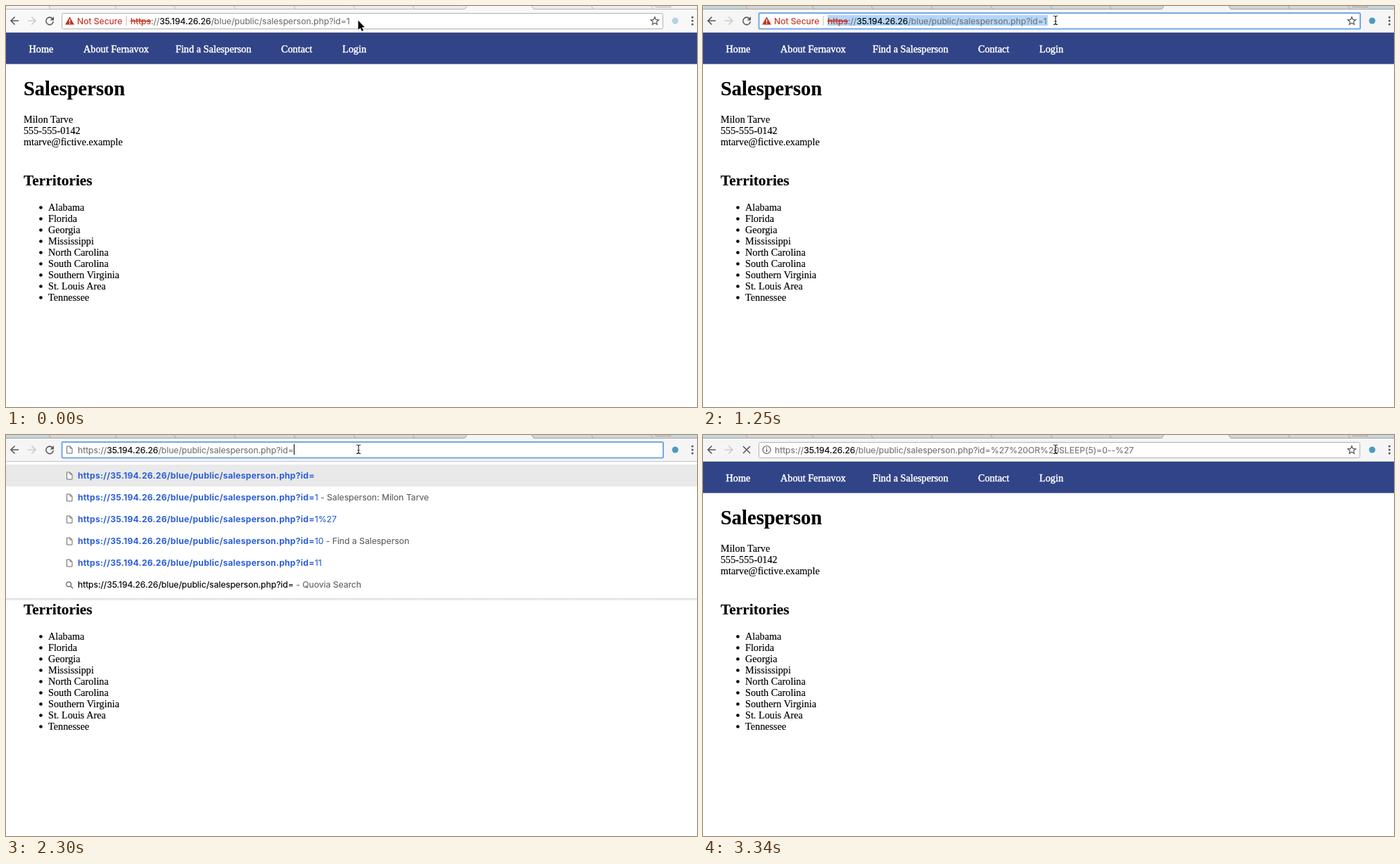
These frames come from a looping animation (982x570 px, 8 s). An HTML page:

```html
<!DOCTYPE html>
<html lang="en">
<head>
<meta charset="utf-8">
<title>Salesperson</title>
<style>
  html, body { margin: 0; width: 100%; height: 100%; overflow: hidden; background: #fff; }
  svg { display: block; }
  text { white-space: pre; color: #000; fill: currentColor; stroke: currentColor; stroke-width: .15px; }
  tspan { fill: currentColor; stroke: currentColor; }
  .page text { font: 14.24px "Liberation Serif", "Times New Roman", serif; }
  .page .h1 { font-size: 28.5px; font-weight: 700; }
  .page .h2 { font-size: 21.36px; font-weight: 700; }
  .page .nav { color: #fff; stroke-width: .45px; }
  .ui text { font: 12.15px Inter, Roboto, sans-serif; font-feature-settings: "calt" 0; }
  .ui .match { font-weight: 700; letter-spacing: .24px; stroke: none; }
  .blue { color: #2d60d6; }
  .grey { color: #757575; }
  .note { color: #626262; }
  .red { color: #c23321; }
  .strike { text-decoration: line-through; }
  .line { fill: none; stroke: #5a5a5a; stroke-width: 1.6; }
</style>
</head>
<body>
<svg id="stage" width="982" height="570" viewBox="0 0 982 570"></svg>
<script>
const LOOP = 8000;
// Start times of the scenes: idle, selected, hover, caret, suggestions, injected, loading
const STARTS = [0, 900, 1250, 1550, 2150, 2750, 3340];

const HOST = "35.194.26.26";
const PATH = "/blue/public/salesperson.php?id=";
const URL_BASE = "https://" + HOST + PATH;
const PERSON = "Milon Tarve";
const ENGINE = "Quovia";
const QUERY = "' OR SLEEP(5)=0--'";

const on = (scenes, body) => `<g data-on="${scenes}">${body}</g>`;
const text = (x, y, body, cls = "") => `<text x="${x}" y="${y}" class="${cls}">${body}</text>`;
const span = (cls, body) => `<tspan class="${cls}">${body}</tspan>`;
const rect = (x, y, w, h, fill, extra = "") =>
  `<rect x="${x}" y="${y}" width="${w}" height="${h}" fill="${fill}" ${extra}/>`;
const path = (d, extra = 'class="line"') => `<path d="${d}" ${extra}/>`;
const dot = (x, y, r, fill) => `<circle cx="${x}" cy="${y}" r="${r}" fill="${fill}"/>`;

function page() {
  const links = [[32.5, "Home"], [110, "About Fernavox"], [241, "Find a Salesperson"],
                 [391, "Contact"], [478, "Login"]];
  const lines = [PERSON, "555-555-0142", "mtarve@fictive.example"];
  const places = ["Alabama", "Florida", "Georgia", "Mississippi", "North Carolina",
                  "South Carolina", "Southern Virginia", "St. Louis Area", "Tennessee"];
  return `<g class="page">
    ${rect(0, 38, 982, 44.5, "#314487")}
    ${links.map(([x, s]) => text(x, 66, s, "nav")).join("")}
    ${text(25, 127, "Salesperson", "h1")}
    ${lines.map((s, i) => text(25, 166 + 16 * i, s)).join("")}
    ${text(25, 255, "Territories", "h2")}
    ${places.map((s, i) => dot(49.5, 286.5 + 16 * i, 2.3, "#000") + text(60, 290.5 + 16 * i, s)).join("")}
  </g>`;
}

function tabs(bg, ends, edge, bar) {
  const cuts = [61, 155, 239, 324, 409, 494, 578, 832, 917];
  const slants = cuts.map(x => `M${x} 0l2.5 4.5`).join("");
  return rect(0, 0, 982, 5, bg) + rect(0, 0, 61, 4, ends) + rect(946, 0, 36, 4, ends) +
    path("M922 0l2 1.5h21l-1-1.5", `fill="${bg}" stroke="${edge}"`) +
    rect(0, 5, 982, 32, bar) +
    path("M655 0L652 5H750L747 0Z", `fill="${bar}"`) +
    path(slants + "M0 4.5H652L655 0M747 0L750 4.5H982", `fill="none" stroke="${edge}"`) +
    rect(0, 37, 982, 1, "#c4c4c6");
}

const pageIcon = (x, y) =>
  path(`M${x - 3.5} ${y - 5}h4.5l3 3v7h-7.5zM${x + 1} ${y - 5}v3h3`,
    'fill="#fff" stroke="#6a6a6a"');

const searchIcon = (x, y) =>
  path(`M${x + 1.8} ${y + 1.8}l3.4 3.4M${x + 2.6} ${y - .8}a3.4 3.4 0 1 1-6.8 0a3.4 3.4 0 1 1 6.8 0`,
    'fill="none" stroke="#6a6a6a" stroke-width="1.3"');

function toolbar() {
  const back = x => `M${x + 6} 21H${x - 5}M${x + .5} 15.5L${x - 5} 21L${x + .5} 26.5`;
  const reload = path("M66 18A5.2 5.2 0 1 0 67.2 22") +
    path("M68 15v5.4h-5.4z", 'fill="#5a5a5a"');
  const star = Array.from({ length: 10 }, (_, i) => {
    const r = i % 2 ? 2.7 : 6, a = i * Math.PI / 5;
    return `${922 + r * Math.sin(a)},${21.5 - r * Math.cos(a)}`;
  }).join(" ");
  return on("0", tabs("#ececec", "#f3f3f3", "#b9b9b9", "#f8f8f8")) +
    on("1 2 3 4 5 6", tabs("#d5d5d5", "#c5d5db", "#a4a4a4", "#f5f5f5")) +
    path(back(12)) +
    path("M31 21H42M36.5 15.5L42 21L36.5 26.5", 'class="line" style="stroke:#cbcbcb"') +
    on("0 1 2 3 4 5", reload) +
    on("6", path("M57 16l10 10M67 16l-10 10")) +
    on("0 6", rect(79.5, 10.5, 854, 22, "#fff", 'rx="2" stroke="#b2b2b2"')) +
    on("1 2 3 4 5", rect(79.5, 10, 854.5, 22.5, "#fff", 'rx="1.5" stroke="#72a9e6" stroke-width="2"')) +
    on("0 1 2 3 6", `<polygon points="${star}" fill="none" stroke="#5a5a5a" stroke-width="1.2"/>`) +
    on("0", dot(951, 21, 4.5, "#b4d3e3")) +
    on("1 2 3 4 5 6", dot(951, 21, 4.5, "#4b9cbd")) +
    [16, 21, 26].map(y => dot(975.5, y, 1.5, "#5a5a5a")).join("");
}

function address() {
  const typed = tail => text(102, 25.5, span("grey", "https://") + HOST + span("grey", PATH + tail));
  const caret = x => rect(x, 13, 1, 15, "#000");
  const warning = path("M90.5 15.2L97 26.5H84Z", 'fill="#c23321"') +
    rect(89.8, 18.8, 1.4, 4, "#fff") + rect(89.8, 23.8, 1.4, 1.4, "#fff");
  const info = path("M96 21a5.5 5.5 0 1 1-11 0a5.5 5.5 0 1 1 11 0",
      'fill="none" stroke="#5a5a5a" stroke-width="1.2"') +
    rect(89.8, 20, 1.4, 4, "#5a5a5a") + rect(89.8, 17.6, 1.4, 1.4, "#5a5a5a");
  return on("1 2", rect(177, 13, 313, 15, "#b3d6fc")) +
    on("0 1 2 3", warning + text(101, 25.5, "Not Secure", "red") +
      rect(170.5, 14, 1, 14, "#d3b3ae") +
      text(177, 25.5, span("red strike", "https") + span("grey", "://") + HOST +
        span("grey", PATH + "1"))) +
    on("3", caret(489)) +
    on("4", pageIcon(90, 21) + typed("") + caret(409)) +
    on("5", pageIcon(90, 21) + typed(QUERY) + caret(520)) +
    on("6", info + typed("%27%20OR%20SLEEP(5)=0--%27"));
}

function suggestions(hits, search) {
  const count = hits.length + 1, bottom = 46 + 31 * count;
  const rowText = ([match, rest, note], i) => pageIcon(90, 58 + 31 * i) +
    text(102, 62 + 31 * i, span("blue match", URL_BASE + match) + span("blue", rest) +
      span("note", note));
  const last = 31 * hits.length;
  return rect(0, 38, 982, bottom - 38, "#fff") +
    rect(0, bottom, 982, 4, "url(#shade)") +
    rect(0, 42, 982, 31, "#e9e9e9") +
    hits.map(rowText).join("") +
    searchIcon(90, 58 + last) +
    text(102, 62 + last, URL_BASE + search + span("note", ` - ${ENGINE} Search`));
}

function pointers() {
  const arrow = path("M500.5 20.5v13.2l3-2.7l2.2 4.8l2.2-1l-2.2-4.6h4z",
    'fill="#000" stroke="#fff" stroke-width="1" paint-order="stroke"');
  const beam = path("M498 14q3 0 3 2q0-2 3-2M501 15.5V25M498 26.5q3 0 3-2q0 2 3 2M499.5 21.8h3",
    'fill="none" stroke="#222" stroke-width="1.1"');
  return on("0 1 5", arrow) + on("2 3 4 6", beam);
}

const stage = document.getElementById("stage");
stage.innerHTML = `<defs><linearGradient id="shade" x2="0" y2="1">
    <stop stop-color="#d9d9d9"/><stop offset="1" stop-color="#fff"/></linearGradient></defs>` +
  page() +
  `<g class="ui">${toolbar()}${address()}` +
  on("4", suggestions([
    ["", "", ""],
    ["", "1", ` - Salesperson: ${PERSON}`],
    ["", "1%27", ""],
    ["", "10", " - Find a Salesperson"],
    ["", "11", ""]
  ], "")) +
  on("5", suggestions([["%27 OR SLEEP(5)=0--%27", "", ""]], QUERY)) +
  `</g>` + pointers();

const layers = [...stage.querySelectorAll("[data-on]")]
  .map(node => ({ node, scenes: node.dataset.on.split(" ").map(Number) }));
let shown = -1;

function draw() {
  const t = performance.now() % LOOP;
  const scene = STARTS.filter(s => s <= t).length - 1;
  if (scene !== shown) {
    for (const { node, scenes } of layers) node.style.display = scenes.includes(scene) ? "" : "none";
    shown = scene;
  }
  requestAnimationFrame(draw);
}
draw();
</script>
</body>
</html>
```
